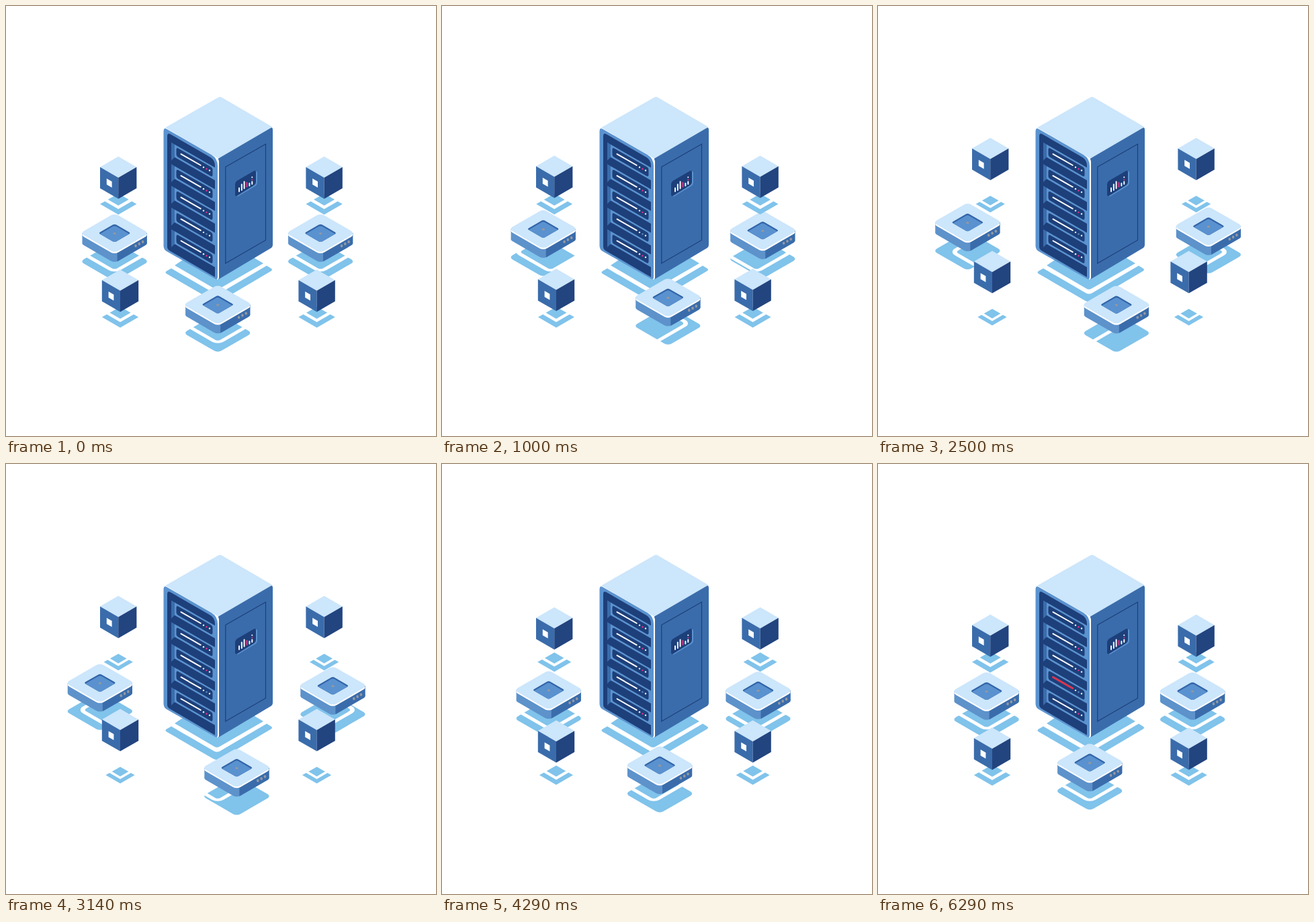
Write an HTML page that moves like this. It is 640 px wide and 640 px high and loops after 7210 ms.

```html
<!DOCTYPE html>
<html lang="en">
<head>
<meta charset="utf-8">
<title>Server network</title>
<style>
  html, body { margin: 0; width: 100%; height: 100%; overflow: hidden; background: #fff; }
  svg { display: block; width: 100vw; height: 100vh; }
</style>
</head>
<body>
<svg viewBox="0 0 640 640">
  <defs>
    <g id="tile">
      <rect x="-29.6" y="-29.6" width="59.2" height="59.2" rx="6.200" transform="matrix(.866 .5 -.866 .5 0 0)"/>
    </g>
    <g id="track">
      <rect x="-29.4" y="-29.4" width="58.8" height="58.8" rx="7" fill="none" stroke="#fff" stroke-width="5.6" transform="matrix(.866 .5 -.866 .5 0 0)"/>
    </g>
    <g id="body">
      <rect x="-48.1" width="96.2" height="15"/>
      <use href="#tile" y="15"/>
    </g>
    <clipPath id="rightSide"><rect x="4" y="-30" width="60" height="90"/></clipPath>
    <clipPath id="hole">
      <rect x="-29.6" y="-29.6" width="59.2" height="59.2" rx="6.200" transform="scale(.467) matrix(.866 .5 -.866 .5 0 0)"/>
    </clipPath>
    <g id="tray">
      <use href="#body" fill="#5d92cb"/>
      <g clip-path="url(#rightSide)"><use href="#body" fill="#3a6cab"/></g>
      <use href="#tile" y="2.3" fill="#fff"/>
      <use href="#tile" fill="#cce6fb"/>
      <g clip-path="url(#hole)">
        <use href="#tile" fill="#3264a8"/>
        <use href="#tile" transform="translate(0 2.5) scale(.467)" fill="#5a91cf"/>
      </g>
      <g fill="#9298a1">
        <ellipse cy=".5" rx="2.3" ry="1.6"/>
        <ellipse cx="31.4" cy="19" rx="1.8" ry="2.2"/>
        <ellipse cx="36.7" cy="16" rx="1.8" ry="2.2"/>
        <ellipse cx="42" cy="13" rx="1.8" ry="2.2"/>
      </g>
    </g>
    <g id="cube">
      <path fill="#cce6fb" d="M0 0 27.2 15.7 0 31.4-27.2 15.7z"/>
      <path fill="#3a6cab" d="M-27.2 15.7 0 31.4V63L-27.2 47.3z"/>
      <path fill="#22447f" d="M27.2 15.7 0 31.4V63L27.2 47.3z"/>
      <path fill="#fff" d="M-17.4 32.8-9.6 37.3V46.3L-17.4 41.8z"/>
    </g>
    <g id="cubeShade" fill="#80c3eb">
      <path d="M0-15.6 15.5-6.7 0 2.3-15.5-6.7z"/>
      <path d="M-20-4.1 0 7.4 20-4.1 27.2 0 0 15.7-27.2 0z"/>
    </g>
    <g id="unit">
      <path fill="#3a6cab" d="M246 203l5 3v19l-5 5z"/>
      <path fill="#5b93cf" d="M251 206 311 240.5V259.5L251 225z"/>
      <path fill="#1d3f7a" d="M253.5 214q0-4 3-2L305 239.5q2.5 1.5 2.5 4v8q0 3-3 1.5L256 225q-2.5-1.5-2.5-4z"/>
      <path stroke="#fff" stroke-width="2" stroke-linecap="round" d="M260.5 220.3 289.7 237"/>
      <circle cx="294" cy="240" r="1.2" fill="#fff"/>
      <circle cx="303" cy="244.8" r="1.2" fill="#fff"/>
    </g>
  </defs>

  <g fill="#80c3eb">
    <path d="M251 386 310 420.500Q314 423 318 420.500L383 383 316 343z"/>
    <path d="M246 390.500 309 427Q314 430 319 427L388 386.500 394.500 390.500Q397.500 392.500 394.500 394.500L320 438.500Q314 442 308 438.500L239 398.500Q236 396.500 239 394.500z"/>
  </g>

  <path fill="#cce6fb" d="M237 181 316 136Q318.500 134.500 321 136L396.500 180 316 227z"/>
  <path fill="#3a6cab" d="M316 227 394 181.500Q397 180 397 184V355Q397 358.500 394 360.500L316 407z"/>
  <path fill="#fff" d="M236 181.500 313 225.500Q317 227.500 317 232V404Q317 407.500 314 407L240 200z"/>
  <path fill="#5b93cf" d="M234.500 187Q234.500 180.500 239 183L306 221.500Q315 227 315 238V403Q315 408.500 311 406L239 365Q234.500 362 234.500 357z"/>
  <path fill="#1d3f7a" d="M240 194Q240 188 245 191L304 225Q311 229 311 238V403.500L244 364.500Q240 362 240 358z"/>
  <g id="units"></g>
  <path id="alert" fill="none" stroke="#e0314b" stroke-width="2.8" stroke-linecap="round"/>

  <path fill="none" stroke="#1d3f7a" stroke-width="1.2" d="M326.800 239.500 386.500 205.500V348.500L326.800 383z"/>
  <path fill="#5b93cf" d="M343 266q0-3 3-5L371 246.500q3-1.500 3 2V263q0 3-3 5L346 283q-3 1.500-3-2z"/>
  <path fill="#1d3f7a" d="M341 265q0-3 3-5L369 245.500q3-1.500 3 2V262q0 3-3 5L344 282.500q-3 1.500-3-2z"/>
  <g fill="none" stroke-width="1.9" stroke-linecap="round">
    <path stroke="#fff" d="M347 271V276M350.800 265.500V274M354.600 261.500V271.500M362.400 264V267.500M366.300 261.500V265"/>
    <path stroke="#e5348c" d="M358.500 263V269M366.300 258.500V258.600"/>
    <path stroke="#fff" d="M366.300 254.800V254.900"/>
  </g>

  <g id="shades" fill="#80c3eb"></g>
  <g id="tracks"></g>
  <g id="trays"></g>
  <g id="cubes"></g>
</svg>
<script>
const byId = id => document.getElementById(id);
const RATE = 14, LOOP = 7210, ROW = 32.3;

function add(parent, name, attrs) {
  const el = document.createElementNS('http://www.w3.org/2000/svg', name);
  for (const key in attrs) el.setAttribute(key, attrs[key]);
  return byId(parent).appendChild(el);
}
const stamp = (parent, id) => add(parent, 'use', { href: '#' + id });
const place = (el, x, y, s = 1) => el.setAttribute('transform', `translate(${x} ${y}) scale(${s})`);

// Sine-eased value at step n; keys are [step, value] pairs.
function tween(n, ...keys) {
  if (n <= keys[0][0]) return keys[0][1];
  for (let i = 1; i < keys.length; i++) {
    const [a, from] = keys[i - 1], [b, to] = keys[i];
    if (n < b) return from + (to - from) * (1 - Math.cos(Math.PI * (n - a) / (b - a))) / 2;
  }
  return keys[keys.length - 1][1];
}

for (let i = 0; i < 5; i++) {
  place(stamp('units', 'unit'), 0, i * ROW);
  add('units', 'circle', { cx: 298.5, cy: 242.5 + i * ROW, r: 1.2, fill: i == 3 ? '#5b93cf' : '#e5348c' });
}

const slide = n => tween(n, [0, 0], [33, 1], [67, 0]);
const trays = [
  [161.6, 338, n => [-28.5 * slide(n), -16 * slide(n)]],
  [468.1, 338, n => [24 * slide(n), -10.2 * slide(n)]],
  [315.2, 444.4, n => [
    tween(n, [0, 0], [16, 22], [33.5, 40], [51, 22], [67, 0]),
    tween(n, [0, 0], [16, -11], [33.5, 0], [50, 11], [67, 0])]]
].map(([x, y, path]) => {
  place(stamp('tracks', 'track'), x, y + 28);
  return { x, y, path, shade: stamp('shades', 'tile'), top: stamp('trays', 'tray') };
});

const cubes = [[167.2, 224], [473.6, 224], [170, 392.3], [462.6, 392.3]].map(([x, y]) =>
  ({ x, y, shade: stamp('cubes', 'cubeShade'), box: stamp('cubes', 'cube') }));

function draw(n) {
  for (const { x, y, path, shade, top } of trays) {
    const [dx, dy] = path(n);
    place(shade, x + dx, y + dy + 42.2);
    place(top, x + dx, y + dy);
  }
  const lift = tween(n, [12, 0], [27, 1], [50, 1], [67.5, 0]);
  for (const { x, y, shade, box } of cubes) {
    place(shade, x, y + 70.8, 1 - .205 * lift);
    place(box, x, y - 27.7 * lift);
  }
  const fill = tween(n, [77, 0], [88, 1]);
  byId('alert').setAttribute('d', fill ? `M260.5 ${220.3 + 3 * ROW}l${29.2 * fill} ${16.7 * fill}` : '');
}

function tick() {
  const t = performance.now() % LOOP;
  draw(Math.floor((t + 5) * RATE / 1000));
  requestAnimationFrame(tick);
}
tick();
</script>
</body>
</html>
```
